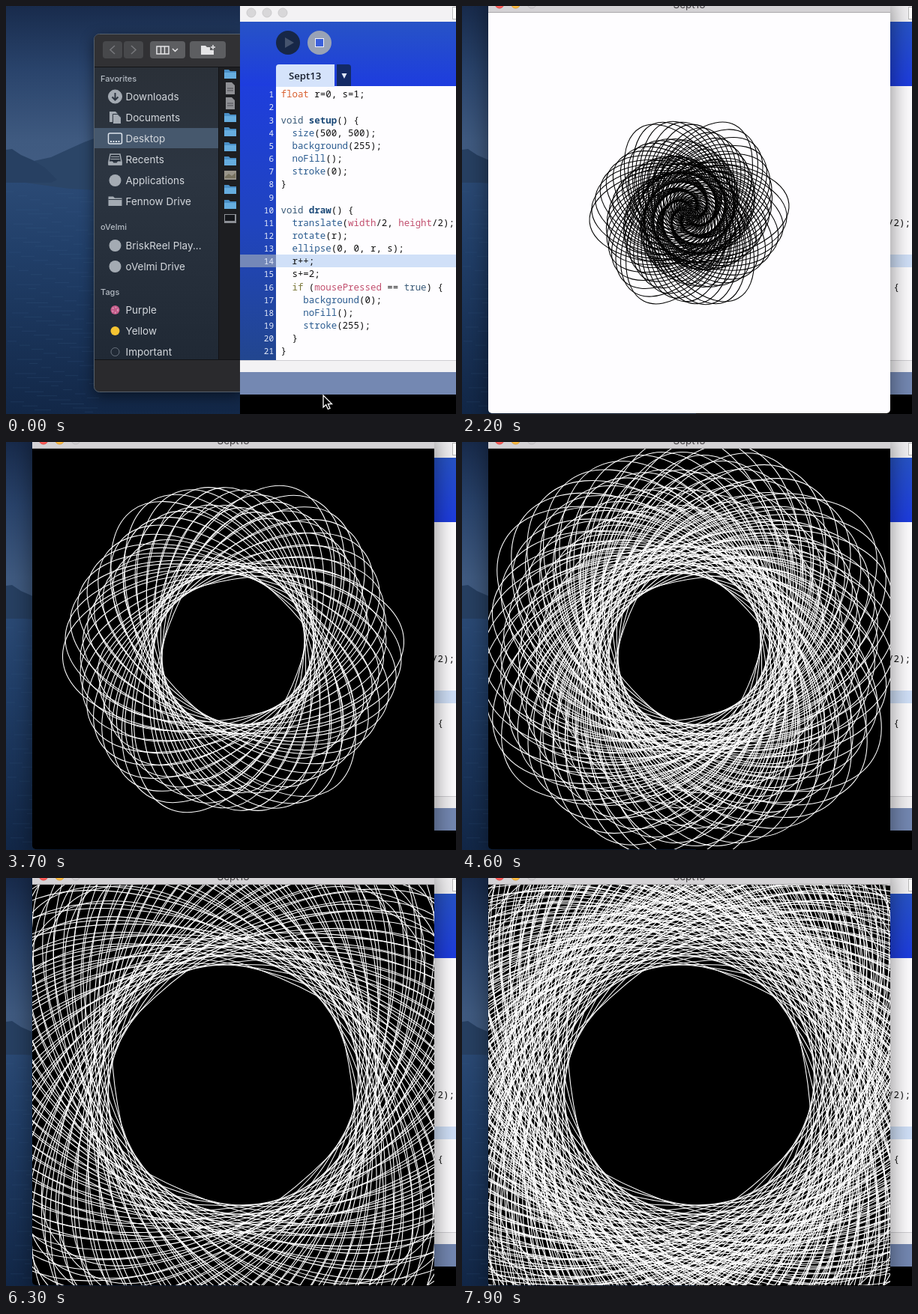
An HTML page with a canvas for the animation above (8000 ms loop, 600 by 545 pixels).

```html
<!DOCTYPE html>
<html lang="en">
<head>
<meta charset="utf-8">
<title>Rotating ellipses</title>
<style>
html, body { margin: 0; width: 100%; height: 100%; overflow: hidden; background: #000; }
svg, canvas { position: absolute; left: 0; top: 0; }
text { white-space: pre; }
.ui { font-family: Inter, sans-serif; }
.side { font-size: 13.5px; fill: #d3d7dc; }
.head { font-size: 11px; font-weight: 500; fill: #b3bac2; }
.code { font: 12.45px "Noto Sans Mono", monospace; fill: #111; }
.num { font: 11px "Noto Sans Mono", monospace; fill: #e6ecfa; text-anchor: end; }
.type { fill: #d9602f; }
.word { fill: #3a5a78; }
.main { fill: #1c4a78; font-weight: 700; }
.func { fill: #2a5b8f; }
.vars { fill: #c2506f; }
.flow { fill: #7d7a3c; }
</style>
</head>
<body>
<svg width="600" height="545" viewBox="0 0 600 545">
  <defs>
    <linearGradient id="sky" x2="0" y2="1">
      <stop offset="0" stop-color="#182b4c"/><stop offset=".35" stop-color="#29436b"/>
      <stop offset=".75" stop-color="#3f5a80"/><stop offset="1" stop-color="#435d83"/>
    </linearGradient>
    <linearGradient id="sea" x2="0" y2="1">
      <stop offset="0" stop-color="#2b4a75"/><stop offset=".3" stop-color="#213f69"/>
      <stop offset="1" stop-color="#122747"/>
    </linearGradient>
    <linearGradient id="bar" x2="0" y2="1">
      <stop offset="0" stop-color="#2753c6"/><stop offset="1" stop-color="#1d3cdf"/>
    </linearGradient>
    <linearGradient id="gutter" x2="0" y2="1">
      <stop offset="0" stop-color="#1e3edc"/><stop offset=".5" stop-color="#2044bf"/>
      <stop offset="1" stop-color="#22468f"/>
    </linearGradient>
    <linearGradient id="panel" x2="0" y2="1">
      <stop offset="0" stop-color="#2a3038"/><stop offset=".35" stop-color="#2c3541"/>
      <stop offset="1" stop-color="#202935"/>
    </linearGradient>
    <filter id="soft"><feGaussianBlur stdDeviation="9"/></filter>
  </defs>

  <!-- wallpaper -->
  <rect width="320" height="240" fill="url(#sky)"/>
  <rect y="234" width="320" height="311" fill="url(#sea)"/>
  <path d="M26 236L37 207 60 202 84 191 104 182 120 176V246L84 244Z" fill="#2b4567"/>
  <path d="M0 192L8 191 20 199 36 206 52 216 68 232 60 236 0 236Z" fill="#274062"/>
  <g id="waves" stroke="#3e5f8b" stroke-opacity=".22"></g>

  <!-- file dialog -->
  <rect x="117" y="42" width="200" height="480" rx="8" fill="#000" opacity=".5" filter="url(#soft)"/>
  <rect x="117.5" y="37.5" width="230" height="478" rx="7" fill="#2a2a2d" stroke="#55606c"/>
  <path d="M118 82V45Q118 38 125 38H312V82Z" fill="#313134"/>
  <rect x="118" y="82" width="166" height="390" fill="url(#panel)"/>
  <rect x="284" y="82" width="30" height="390" fill="#1d1e21"/>
  <path d="M118 81.500H312M118 472.500H312M283.500 82V472" stroke="#121316"/>
  <rect x="118" y="163" width="165" height="27" fill="#46586d"/>
  <g fill="#47484b">
    <rect x="129" y="47" width="26" height="23" rx="4"/><rect x="157" y="47" width="26" height="23" rx="4"/>
  </g>
  <g fill="#5d5e61">
    <rect x="192" y="47" width="47" height="23" rx="4"/><rect x="245" y="47" width="48" height="23" rx="4"/>
  </g>
  <g fill="none" stroke-width="1.5">
    <path d="M145 53L139 58.500 145 64M167 53L173 58.500 167 64" stroke="#77787c"/>
    <path d="M201 54H217V64H201ZM206.500 54V64M211.500 54V64M222 57L225.500 60.500 229 57" stroke="#e4e4e6"/>
  </g>
  <path d="M260 53H266L268 55H272V59H277V65H260Z" fill="#e4e4e6"/>
  <path d="M273 55H279M276 52V58" stroke="#e4e4e6" stroke-width="1.500"/>
  <g id="files"></g>
  <g id="side" class="ui"></g>
  <g fill="#a4abb3" stroke="#a4abb3">
    <circle cx="145.500" cy="121" r="9"/>
    <path d="M145.500 116V125M141.500 121.500L145.500 125.500 149.500 121.500" fill="none" stroke="#2c3541" stroke-width="2"/>
    <path d="M138 141H146L149 144V155H138Z" stroke="none"/>
    <path d="M142.500 144.500H149L153.500 149V157.500H142.500Z" stroke="#2c3541"/>
    <rect x="136.500" y="170" width="18" height="14" rx="2" fill="none" stroke="#dde4ec" stroke-width="1.500"/>
    <path d="M139 181H152" stroke="#dde4ec" stroke-width="2" stroke-dasharray="2 1.500"/>
    <path d="M139 198H152L154 208V212H137V208Z" fill="none" stroke-width="1.500"/>
    <path d="M140 201.500H151M139.500 204.500H151.500M137 208H142L143 210H148L149 208H154V212H137Z"/>
    <path d="M136.500 254.500H143L145 256.500H154.500V267H136.500Z" stroke="none"/>
    <path d="M136.500 258.500H154.500" stroke="#2c3541"/>
    <g stroke="none">
      <circle cx="145.500" cy="233" r="8"/><circle cx="145.500" cy="320" r="8"/><circle cx="145.500" cy="348" r="8"/>
    </g>
  </g>
  <circle cx="145.500" cy="406" r="6" fill="#c25a88"/>
  <circle cx="145.500" cy="406" r="3.500" fill="none" stroke="#dc94b4" stroke-dasharray="2 2" stroke-width="2"/>
  <circle cx="145.500" cy="434" r="6" fill="#f6c432"/>
  <circle cx="145.500" cy="462" r="5.500" fill="none" stroke="#6a7480"/>

  <!-- code editor -->
  <rect x="312" width="288" height="545" fill="#f3f2f4"/>
  <g fill="#d8d7d9" stroke="#cbcacc">
    <circle cx="327" cy="9" r="6"/><circle cx="348" cy="9" r="6"/><circle cx="369" cy="9" r="6"/>
  </g>
  <rect x="595.500" y="1.500" width="12" height="16" fill="#fff" stroke="#bbb"/>
  <rect x="312" y="21" width="288" height="87" fill="url(#bar)"/>
  <rect x="312" y="107" width="48" height="366" fill="url(#gutter)"/>
  <rect x="360" y="107" width="240" height="366" fill="#fefdff"/>
  <circle cx="376" cy="49" r="16" fill="#172747"/>
  <path d="M372 42L384 49 372 56Z" fill="#46546e"/>
  <circle cx="418" cy="49" r="16" fill="#98a2b6"/>
  <rect x="412.500" y="43.500" width="11" height="11" fill="#3a5fdc" stroke="#f0f3fc"/>
  <path d="M360 108V82Q360 78 364 78H438V108Z" fill="#d5e3fb"/>
  <text x="377" y="98" font-family="Open Sans, sans-serif" font-size="13.200" font-weight="600" fill="#151d2c">Sept13</text>
  <path d="M441 78H456Q460 78 460 82V107H441Z" fill="#132a66"/>
  <path d="M447.500 90H454.500L451 97Z" fill="#dfe8fa"/>
  <rect x="312" y="332" width="48" height="17" fill="#7488b8"/>
  <rect x="360" y="332" width="240" height="17" fill="#d0e0f8"/>
  <g id="code"></g>
  <path d="M312 473.500H600" stroke="#cfced2"/>
  <rect x="312" y="489" width="288" height="30" fill="#7488b2"/>
  <rect x="312" y="519" width="288" height="26" fill="#000"/>
</svg>

<canvas id="sketch" width="600" height="545"></canvas>

<svg id="pointer" width="20" height="24" viewBox="-2 -2 20 24">
  <path d="M0 0V16L3.700 12.600 6.300 18.500 9 17.300 6.400 11.600H11.500Z" fill="#000" stroke="#fff" stroke-width="1.300"/>
</svg>

<script>
const $ = id => document.getElementById(id);

const program = `float r=0, s=1;

void setup() {
  size(500, 500);
  background(255);
  noFill();
  stroke(0);
}

void draw() {
  translate(width/2, height/2);
  rotate(r);
  ellipse(0, 0, r, s);
  r++;
  s+=2;
  if (mousePressed == true) {
    background(0);
    noFill();
    stroke(255);
  }
}`;

const syntax = {
  type: /^float$/, word: /^(void|true)$/, main: /^(setup|draw)$/,
  func: /^(size|background|noFill|stroke|translate|rotate|ellipse)$/,
  vars: /^(width|height|mousePressed)$/, flow: /^if$/
};

function paint(word) {
  const kind = Object.keys(syntax).find(k => syntax[k].test(word));
  return kind ? `<tspan class="${kind}">${word}</tspan>` : word;
}

$('code').innerHTML = program.split('\n').map((line, i) => {
  const y = 122.3 + i * 17.15;
  return `<text class="num" x="357" y="${y}">${i + 1}</text>` +
    `<text class="code" x="366.500" y="${y}">${line.replace(/[a-zA-Z]+/g, paint)}</text>`;
}).join('');

const label = (kind, x, y, name) => `<text class="${kind}" x="${x}" y="${y}">${name}</text>`;
$('side').innerHTML =
  [['Favorites', 101], ['oVelmi', 299], ['Tags', 386]].map(([s, y]) => label('head', 126, y, s)).join('') +
  [['Downloads', 126], ['Documents', 154], ['Desktop', 182], ['Recents', 210], ['Applications', 238],
   ['Fennow Drive', 266], ['BriskReel Play...', 325], ['oVelmi Drive', 353],
   ['Purple', 411], ['Yellow', 439], ['Important', 467]].map(([s, y]) => label('side', 159.5, y, s)).join('');

const fileIcon = {
  d: y => `<path d="M291 ${y - 6}h6l2 2h8v10h-16z" fill="#4a8fc6"/><path d="M291 ${y - 2}h16v8h-16z" fill="#66addf"/>`,
  t: y => `<path d="M293 ${y - 8}h8l4 4v12h-12z" fill="#8f9094"/><path d="M295 ${y}h8m-8 3h8" stroke="#4c4d52"/>`,
  p: y => `<path d="M291 ${y - 6}h16v12h-16z" fill="#99958a"/><path d="M292 ${y + 2}l5-4 4 3 5-4v7h-14z" fill="#77725f"/>`,
  s: y => `<path d="M291 ${y - 6}h16v12h-16z" fill="#8d9096"/><path d="M292 ${y - 5}h13v8h-13z" fill="#15171b"/>`
};
$('files').innerHTML = [...'dttddddpdds'].map((kind, i) => fileIcon[kind](Math.round(91 + i * 19.3))).join('');

$('waves').innerHTML = Array.from({ length: 110 }, (_, i) => {
  const x = i * 67 % 118, y = 248 + i * 2.7;
  return `<path d="M${x} ${y}h${10 + i * 13 % 24}"/>`;
}).join('');

// Sketch window: 500 units drawn across 536 pixels
const ctx = $('sketch').getContext('2d');
const WIN = { x: 35, y: 8.5, size: 536 }, SCALE = WIN.size / 500;
// Steps at which the mouse goes down and comes up again
const PRESSES = [[163, 170], [284, 291]];

function circle(x, y, r, fill, edge) {
  ctx.beginPath();
  ctx.arc(x, y, r, 0, 7);
  ctx.fillStyle = fill;
  ctx.fill();
  ctx.strokeStyle = edge;
  ctx.stroke();
}

function drawFrame(dark) {
  ctx.save();
  ctx.shadowColor = 'rgba(0,0,0,.5)';
  ctx.shadowBlur = 32;
  ctx.shadowOffsetY = 10;
  ctx.fillStyle = dark ? '#000' : '#fefdff';
  ctx.beginPath();
  ctx.roundRect(WIN.x, -20, WIN.size, 564, 5);
  ctx.fill();
  ctx.restore();

  ctx.fillStyle = '#d4d2d5';
  ctx.fillRect(WIN.x, 0, WIN.size, 8);
  ctx.fillStyle = '#aaa8ab';
  ctx.fillRect(WIN.x, 8, WIN.size, 1);
  ctx.lineWidth = 1;
  circle(50, -3, 6, '#fc5b57', '#df4744');
  circle(71.5, -3, 6, '#fdbc40', '#de9f34');
  circle(93, -3, 6, '#d0ced1', '#bbb9bc');
  ctx.fillStyle = '#454346';
  ctx.font = '13.5px Inter, sans-serif';
  ctx.textAlign = 'center';
  ctx.fillText('Sept13', 303, 3);
}

function drawEllipses(from, to, colour) {
  ctx.save();
  ctx.beginPath();
  ctx.rect(WIN.x, 9, WIN.size, 535);
  ctx.clip();
  ctx.translate(WIN.x + WIN.size / 2, WIN.y + WIN.size / 2);
  ctx.scale(SCALE, SCALE);
  ctx.strokeStyle = colour;
  for (let r = from; r <= to; r++) {
    ctx.beginPath();
    ctx.ellipse(0, 0, r / 2, r + .5, r, 0, 2 * Math.PI);
    ctx.stroke();
  }
  ctx.restore();
}

function render(now) {
  const tick = Math.floor(now % 8000 / 100);
  ctx.clearRect(0, 0, 600, 545);
  if (tick > 0) {
    const last = tick * 6 - 8;
    const press = PRESSES.filter(p => last >= p[0]).pop();
    drawFrame(!!press);
    drawEllipses(press ? press[1] : 0, last, press ? '#fff' : '#000');
  }
  const pointer = $('pointer').style;
  pointer.display = tick < 10 ? '' : 'none';
  pointer.transform = `translate(421px, ${tick ? 520 : 518}px)`;
  requestAnimationFrame(render);
}
requestAnimationFrame(render);
</script>
</body>
</html>
```
